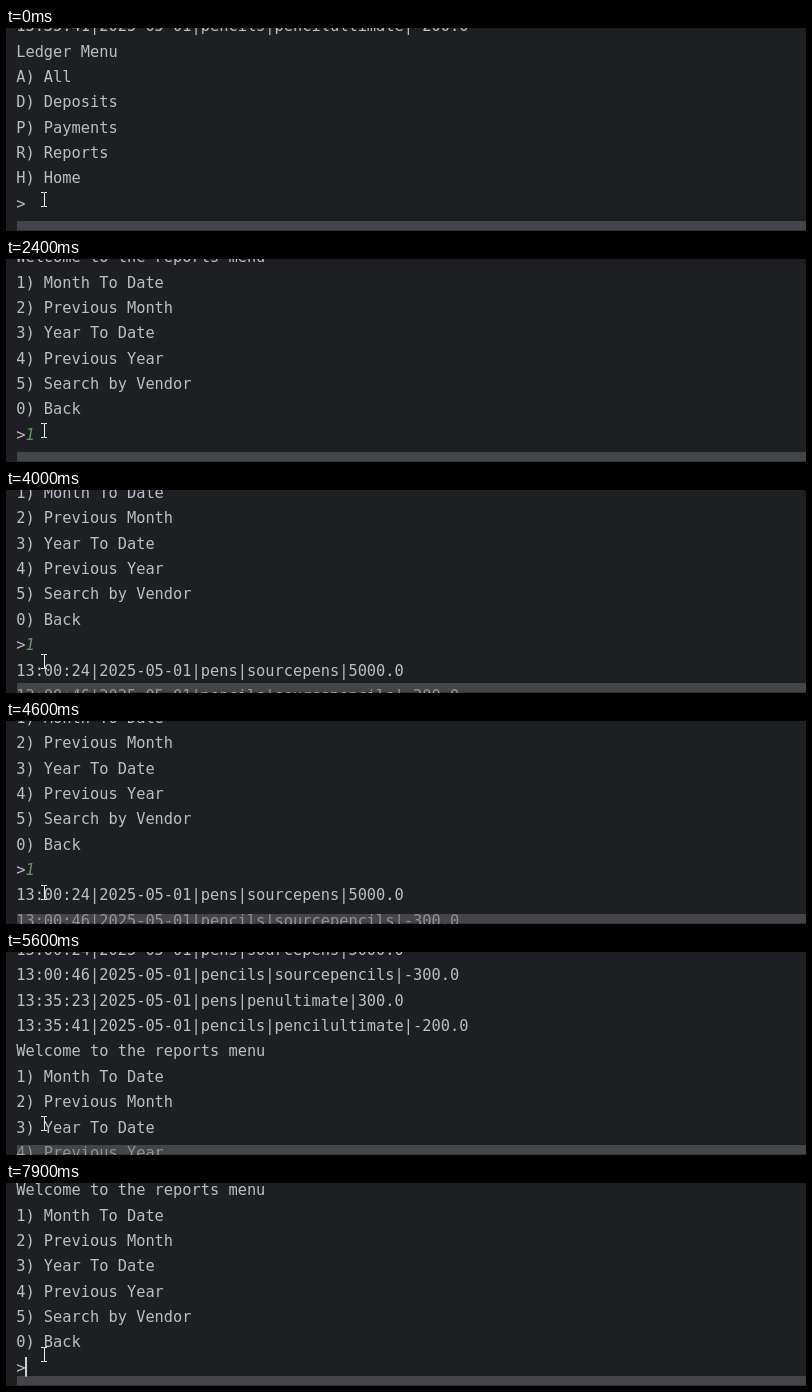
Animation, 800 px wide and 203 px high, one loop 8000 ms. Source, as an HTML page:

```html
<!DOCTYPE html>
<html lang="en">
<head>
<meta charset="utf-8">
<title>Ledger console</title>
<style>
  html, body { margin: 0; width: 100%; height: 100%; overflow: hidden; background: #1e1f22; }
  svg { display: block; width: 800px; height: 203px; }
  text { font: 15.33px "DejaVu Sans Mono", monospace; fill: #bcbec4; white-space: pre; }
  .input { fill: #62975a; font-style: italic; }
</style>
</head>
<body>
<svg viewBox="0 0 800 203">
  <rect width="800" height="203" fill="#1e1f22"/>
  <g id="console"></g>
  <rect id="caret" width="2" height="20" fill="#ced0d6"/>
  <rect x="11" y="193" width="789" height="9.5" fill="#68696c" fill-opacity=".52"/>
  <path d="M35 164.5h2.5l.5 .5l.5-.5h2.5M38.5 165v13M35 178.5h2.5l.5-.5l.5 .5h2.5"
        fill="none" stroke="#f2f2f2" stroke-width="1"/>
</svg>
<script>
const NS = "http://www.w3.org/2000/svg";
const LOOP = 8000, TICK = 100;
const LEFT = 10.2, CHAR = 9.23, LINE = 25.35, BASE = 180.8;

const reports = [
  "Welcome to the reports menu", "1) Month To Date", "2) Previous Month",
  "3) Year To Date", "4) Previous Year", "5) Search by Vendor", "0) Back", ">"
];
const lines = [
  "13:35:41|2025-05-01|pencils|pencilultimate|-200.0",
  "Ledger Menu", "A) All", "D) Deposits", "P) Payments", "R) Reports", "H) Home", ">",
  ...reports,
  "13:00:24|2025-05-01|pens|sourcepens|5000.0",
  "13:00:46|2025-05-01|pencils|sourcepencils|-300.0",
  "13:35:23|2025-05-01|pens|penultimate|300.0",
  "13:35:41|2025-05-01|pencils|pencilultimate|-200.0",
  ...reports
];

// Prompts: line number, key pressed, time typed, time of Enter
const prompts = [
  { line: 7, key: "R", typed: 300, enter: 700 },
  { line: 15, key: "1", typed: 2300, enter: 2700 },
  { line: 27, key: "", typed: Infinity, enter: Infinity }
];

// Distance scrolled up from the bottom: time, pixels
const scroll = [
  [0, 0], [2700, 0], [3200, 221.5], [3500, 221.5], [4100, 296], [4300, 296],
  [4600, 277.5], [5200, 168.5], [6200, 0], [7100, 0], [7300, 20], [7400, 0],
  [7700, 0], [7900, 9], [8000, 9]
];

function scrollAt(t) {
  const i = scroll.findIndex(p => p[0] > t);
  const [t0, a] = scroll[i - 1], [t1, b] = scroll[i];
  return a + (b - a) * (t - t0) / (t1 - t0);
}

function caretOn(t) {
  const since = t >= 700 && t < 2300 ? t : t + 400;
  const phase = t >= 700 && t < 2300 ? since - 100 : since;
  return Math.floor(phase / 600) % 2 === 1;
}

const group = document.getElementById("console");
const caret = document.getElementById("caret");

function addText(str, x) {
  const el = document.createElementNS(NS, "text");
  el.setAttribute("x", x);
  el.textContent = str;
  return group.appendChild(el);
}

const rows = lines.map(str => addText(str, LEFT));
const inputs = prompts.map(p => {
  const el = addText(p.key, LEFT + CHAR);
  el.setAttribute("class", "input");
  return el;
});

function place(el, y, shown) {
  el.setAttribute("y", y.toFixed(2));
  el.style.display = shown ? "" : "none";
}

function draw(t) {
  const now = prompts.find(p => t < p.enter);
  const up = scrollAt(t);
  const yOf = i => BASE + (i - now.line) * LINE + up;

  rows.forEach((el, i) => place(el, yOf(i), i <= now.line));
  prompts.forEach((p, i) => place(inputs[i], yOf(p.line), t >= p.typed));

  const col = t >= now.typed ? 2 : 1;
  caret.setAttribute("x", Math.round(LEFT + col * CHAR - 0.5));
  place(caret, Math.round(yOf(now.line) - 16), caretOn(t));
}

function frame() {
  const t = performance.now() % LOOP;
  draw(Math.floor(t / TICK) * TICK);
  requestAnimationFrame(frame);
}
frame();
</script>
</body>
</html>
```
